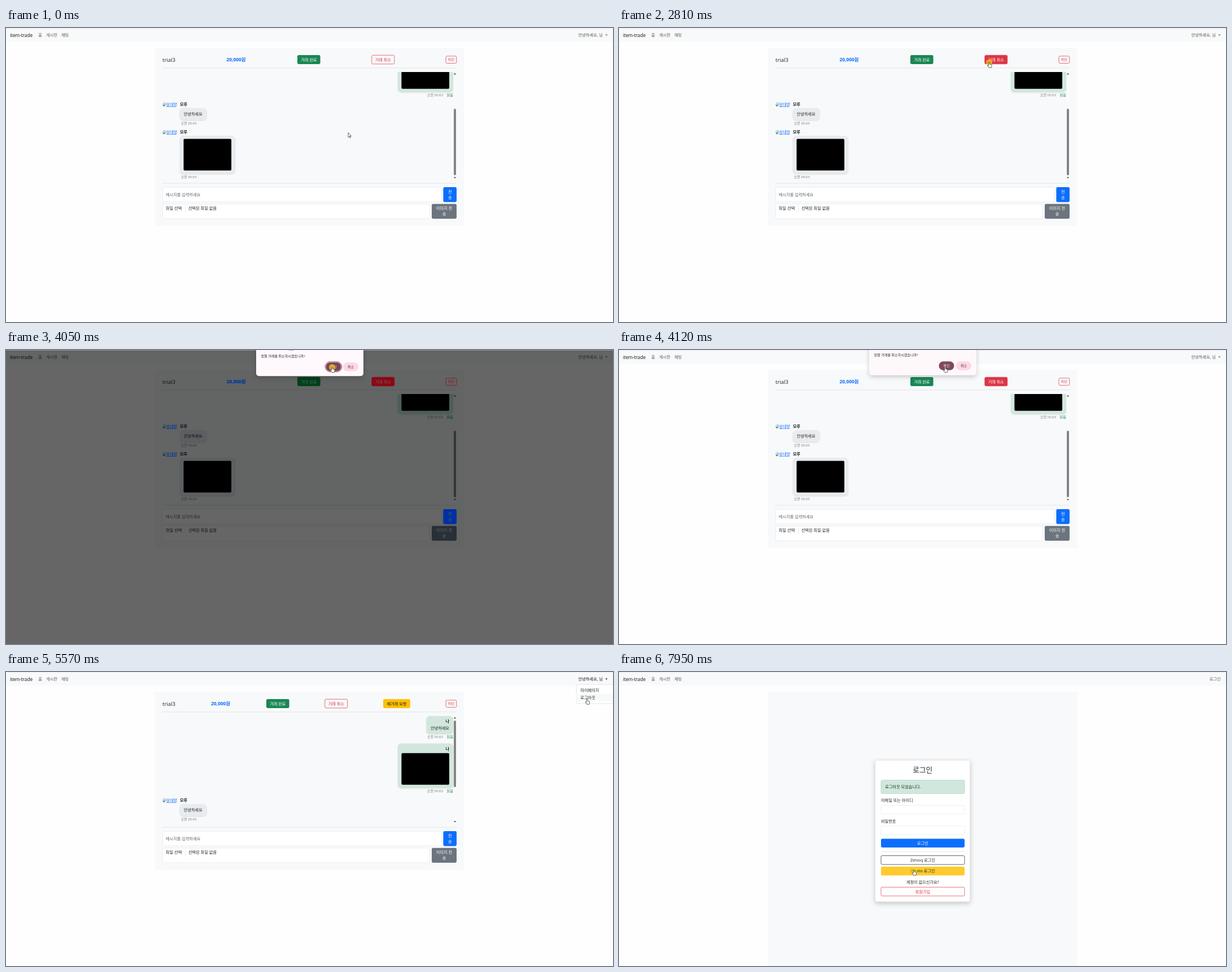
Write an HTML page that moves like this. It is 1075 px wide and 521 px high and loops after 8000 ms.

```html
<!DOCTYPE html>
<html lang="ko">
<head>
<meta charset="utf-8">
<style>
html, body { margin: 0; width: 100%; height: 100%; overflow: hidden; background: #fefefe }
svg { display: block; width: 1075px; height: 521px; font-family: 'Open Sans', 'Noto Sans CJK KR', 'Noto Sans CJK', sans-serif }
.dim { filter: brightness(.4) saturate(2) }
.soft { filter: drop-shadow(0 1px 1.2px #0002) }
.card { filter: drop-shadow(0 3px 4px #0003) }
</style>
</head>
<body>
<svg id="stage" viewBox="0 0 1075 521"></svg>
<script>
const LOOP = 8000;
const INK = '#212529', GRAY = '#6c757d', LINE = '#dee2e6', BLUE = '#0d6efd',
  GREEN = '#198754', RED = '#dc3545', YELLOW = '#ffc107', MINT = '#d1e7dd', PALE = '#f8f9fa';

// Pointer stops: time, x, y
const PATH = [
  [60, 606, 185.5], [280, 604, 188], [900, 604, 188], [1670, 655.5, 60],
  [2840, 655.5, 60], [3570, 580, 30], [3600, 580, 30], [3780, 577.5, 29.5],
  [4120, 577.5, 29.5], [4400, 628, 108], [4540, 628, 108], [5290, 1042, 10],
  [5360, 1042, 10], [5570, 1029, 47], [6810, 1029, 47], [7120, 637, 174],
  [7250, 637, 174], [7880, 522, 350]
];
const CLICKS = [2810, 4050, 5290, 6770, 7950];
const OPEN = 2880, CLOSE = 4120, CANCELLED = 4260, MENU = 5340, LOGIN = 6890;

const clamp = v => Math.max(0, Math.min(1, v));
const smooth = v => v * v * (3 - 2 * v);

function pointerAt(t) {
  const i = PATH.findIndex(p => p[0] > t);
  if (i == 0) return PATH[0].slice(1);
  if (i < 0) return PATH[PATH.length - 1].slice(1);
  const [t0, x0, y0] = PATH[i - 1], [t1, x1, y1] = PATH[i];
  const k = smooth((t - t0) / (t1 - t0));
  return [x0 + (x1 - x0) * k, y0 + (y1 - y0) * k];
}

const rect = (x, y, w, h, fill, r = 0, more = '') =>
  `<rect x="${x}" y="${y}" width="${w}" height="${h}" rx="${r}" fill="${fill}" ${more}/>`;
const text = (x, y, str, fill = INK, size = 7.2, anchor = 'start', weight = 400) =>
  `<text x="${x}" y="${y}" fill="${fill}" font-size="${size}" text-anchor="${anchor}" font-weight="${weight}">${str}</text>`;
const rule = (x, y, w) => rect(x, y, w, .6, '#d5d8db');
const field = (x, y, w, h) => rect(x, y, w, h, '#fff', 2.2, `stroke="${LINE}" stroke-width=".6"`);

let mouse, hand;
function over(x, y, w, h) {
  const hit = mouse[0] >= x && mouse[0] <= x + w && mouse[1] >= y && mouse[1] <= y + h;
  if (hit) hand = true;
  return hit;
}

function button(x, y, w, h, label, fill, hot = fill, color = '#fff') {
  return rect(x, y, w, h, over(x, y, w, h) ? hot : fill, 2.4)
    + text(x + w / 2, y + h / 2 + 2.6, label, color, 7.2, 'middle');
}
function outline(x, y, w, h, label, color, size = 7.2, held = false) {
  const hot = over(x, y, w, h) || held;
  return rect(x, y, w, h, hot ? color : 'none', 2.2, `stroke="${color}" stroke-width=".7"`)
    + text(x + w / 2, y + h / 2 + size * .36, label, hot ? '#fff' : color, size, 'middle');
}

function nav(t) {
  const soft = '#5a5b5b', out = t >= LOGIN;
  let s = rect(0, 0, 1075, 24, PALE) + text(7, 15.6, 'item-trade', '#111', 8.2, 'start', 500)
    + text(57.3, 15, '홈', soft) + text(71, 15, '게시판', soft) + text(98, 15, '채팅', soft);
  if (out) return s + text(1065.5, 15, '로그인', soft, 7.2, 'end');
  const c = t >= MENU ? '#191919' : over(1011, 4, 57, 16) ? '#333' : soft;
  return s + text(1013.5, 15, '안녕하세요, 님', c) + `<path d="M1061.3 11.4h4.2l-2.1 2.2z" fill="${c}"/>`;
}

function header(t) {
  const done = t >= CANCELLED;
  return text(277, 60.2, 'trial3', INK, 9.6)
    + text(done ? 380 : 407.5, 59.4, '20,000원', BLUE, 8.4, 'middle', 700)
    + button(done ? 461 : 516, 48, 40.6, 16, '거래 완료', GREEN, '#157347')
    + outline(done ? 564.8 : 647.8, 48.2, 40, 15.6, '거래 취소', RED, 7.2, !done && t >= 2800)
    + (done ? button(668, 48, 47.8, 16, '재거래 요청', YELLOW, '#ffca2c', '#111') : '')
    + outline(779, 49.8, 18.8, 12.7, '차단', RED, 6.2)
    + rule(277, 70.6, 521);
}

const photo = (x, y) => rect(x, y, 84.6, 56, '#000', 2);
const stamp = (x, y) => text(x, y, '오전 05:03', GRAY, 6);

function mine(x, y, w, h, time) {
  return rect(x, y, w, h, MINT, 6, 'class="soft"') + text(785, y + 12.4, '나', INK, 7.2, 'end', 600)
    + stamp(746, time) + text(792, time, '읽음', GREEN, 6.2, 'end');
}
function theirs(y, w, h) {
  return `<g clip-path="url(#oval)" transform="translate(0 ${y})">`
    + '<path d="M277-4h4l2 2v3l-3 1-3 3z" fill="#c5d9f3" stroke="#888" stroke-width=".5"/><path d="M277 3l3-3 2 2-3 2z" fill="#4b9b4b"/>'
    + text(283.6, 2.6, '상대방', BLUE) + rect(283.6, 3.6, 21, .6, BLUE) + '</g>'
    + text(308, y + 2, '모루', INK, 7.2, 'start', 600)
    + rect(308, y + 6.6, w, h, '#e9ecef', 6, 'class="soft"') + stamp(309.8, y + h + 14.5);
}

function chat(t) {
  const top = t >= CANCELLED ? 0 : 92;
  return '<g clip-path="url(#view)">' + `<g transform="translate(0 ${-top})">`
    + mine(744.5, 78, 47.5, 31.5, 117.4) + text(785, 101.6, '안녕하세요', INK, 7.2, 'end')
    + mine(694, 126.7, 98, 78.6, 213.3) + photo(700.4, 143.8)
    + theirs(227.5, 47.3, 21) + text(314.7, 246.7, '안녕하세요')
    + theirs(276.7, 97.6, 66.6) + photo(314.5, 288.6)
    + '</g></g>'
    + rect(792.6, 78, 5, 190, '#fafafa') + rect(793, top ? 143 : 86, 4, 118, '#858585', 2)
    + '<path d="M793 82.4h4l-2-2.8zM793 264h4l-2 2.8z" fill="#555"/>';
}

function composer() {
  return rule(277, 274.8, 521)
    + field(277.4, 282.2, 494, 25.8) + text(283, 297.8, '메시지를 입력하세요', '#5f656b')
    + button(774.4, 282, 23.6, 26.4, '', BLUE, '#0b5ed7')
    + text(786.3, 292.6, '전', '#fff', 7.2, 'middle') + text(786.3, 302.7, '송', '#fff', 7.2, 'middle')
    + field(277.4, 312, 473, 26) + rect(317.4, 312, .6, 15, LINE)
    + text(283, 322.4, '파일 선택') + text(323, 322.4, '선택된 파일 없음')
    + button(754, 311.7, 44, 26.3, '', GRAY, '#5c636a')
    + text(776, 322.2, '이미지 전', '#fff', 7.2, 'middle') + text(776, 332.3, '송', '#fff', 7.2, 'middle');
}

function menu() {
  const item = (y, label) => (over(1010.5, y, 65, 13.4) ? rect(1010.5, y, 65, 13.4, PALE) : '')
    + text(1017.3, y + 9.2, label);
  return rect(1010.2, 22, 70, 34, '#fff', 2.4, 'stroke="#d0d2d4" stroke-width=".6"')
    + item(25.4, '마이페이지') + item(38.8, '로그아웃');
}

function login() {
  const x = 464, w = 148, h = 15.6;
  return rect(264, 35, 548, 486, PALE)
    + rect(453.6, 156.2, 168.2, 251, '#fff', 2.4, 'stroke="#d3d5d7" stroke-width=".6" class="card"')
    + text(537.7, 178.2, '로그인', INK, 12.6, 'middle')
    + rect(x, 191.5, w, 24, MINT, 2.2, 'stroke="#a3cfbb" stroke-width=".6"')
    + text(471.3, 206.2, '로그아웃 되었습니다.', '#0a3622')
    + text(x, 230, '이메일 또는 아이디') + field(x, 236.4, w, 15.2)
    + text(x, 266.6, '비밀번호') + field(x, 272.9, w, 15.2)
    + button(x, 295.4, w, h, '로그인', BLUE, '#0b5ed7') + rule(x, 318, w)
    + outline(x, 325.5, w, h, 'Zelvoq 로그인', INK)
    + button(x, 345, w, h, 'Pumlo 로그인', YELLOW, '#ffca2c', INK)
    + text(537.7, 375.2, '계정이 없으신가요?', INK, 7.2, 'middle')
    + outline(x, 381.3, w, h, '회원가입', RED);
}

function dialog(t) {
  const shown = smooth(clamp((t - OPEN + 24) / 200)), gone = clamp((t - CLOSE + 20) / 140);
  const y = -10.5 * (1 - shown) - 11 * gone;
  const alpha = clamp(shown * 1.2) * (1 - gone * gone);
  const ring = t < CLOSE ? rect(565.2, 20.8, 29.6, 17.8, '#fff', 8.9, 'stroke="#7d4459" stroke-width="1"') : '';
  const pill = (x, w, label, fill, color) =>
    rect(x, 22, w, 15.4, fill, 7.7) + text(x + w / 2, 31.8, label, color, 5.9, 'middle');
  over(566.5, 22, 27, 15.4);
  over(597, 22, 27, 15.4);
  return `<g opacity="${alpha}" transform="translate(0 ${y})">`
    + rect(443, -40, 190, 86.3, '#fff8fc', 5, 'class="card"')
    + text(451.6, .4, 'localhost:8080 내용:', '#222', 6.6) + text(451.6, 12.8, '정말 거래를 취소하시겠습니까?', '#222', 6.05)
    + ring + pill(566.5, 27, '확인', '#7d4459', '#fff') + pill(597, 27, '취소', '#fdd8e4', '#4b2030') + '</g>';
}

function cursor(t) {
  const [x, y] = mouse;
  const glow = CLICKS.some(c => t >= c && t < c + 70)
    ? `<circle cx="${x}" cy="${y + 1}" r="5.6" fill="#ffd500" opacity=".65"/>` : '';
  const shape = hand
    ? 'M-.9 .7Q0-.6 .9 .7V4L3.5 4.6Q4.9 5 4.7 6.5L3.9 10.2H-.5L-3 6.9Q-3 5.6-1.8 6L-.9 6.8Z'
    : 'M0 0V8.2L1.9 6.5 3.1 9.1 4.3 8.6 3.1 6.1H5.5Z';
  return glow + `<path transform="translate(${x} ${y})" d="${shape}" fill="#fff" stroke="#222" stroke-width=".7" stroke-linejoin="round"/>`;
}

const DEFS = '<defs><clipPath id="view"><rect x="270" y="78" width="524" height="190"/></clipPath>'
  + '<clipPath id="oval"><ellipse cx="290.7" cy="0" rx="13.6" ry="6.4"/></clipPath></defs>';

function scene(t) {
  const dimmed = t >= OPEN && t < CLOSE, asking = t >= OPEN && t < CANCELLED;
  const real = pointerAt(t);
  // The page ignores the pointer while the dialog is up
  mouse = asking ? [-99, -99] : real;
  hand = t >= OPEN && t < 2950;
  let s = rect(0, 0, 1075, 521, '#fefefe') + nav(t);
  if (t < LOGIN) s += rect(264, 35, 547.5, 316, PALE) + header(t) + chat(t) + composer();
  else s += login();
  if (t >= MENU && t < LOGIN) s += menu();
  s = `<g class="${dimmed ? 'dim' : ''}">${s}</g>`;
  mouse = real;
  return DEFS + s + rect(0, 0, 1075, .8, dimmed ? '#a3969b' : '#f8e4ea')
    + (asking ? dialog(t) : '') + cursor(t);
}

const stage = document.getElementById('stage');
const start = performance.now();
let last = '';
function draw() {
  const now = scene((performance.now() - start) % LOOP);
  if (now !== last) stage.innerHTML = last = now;
  requestAnimationFrame(draw);
}
draw();
</script>
</body>
</html>
```
